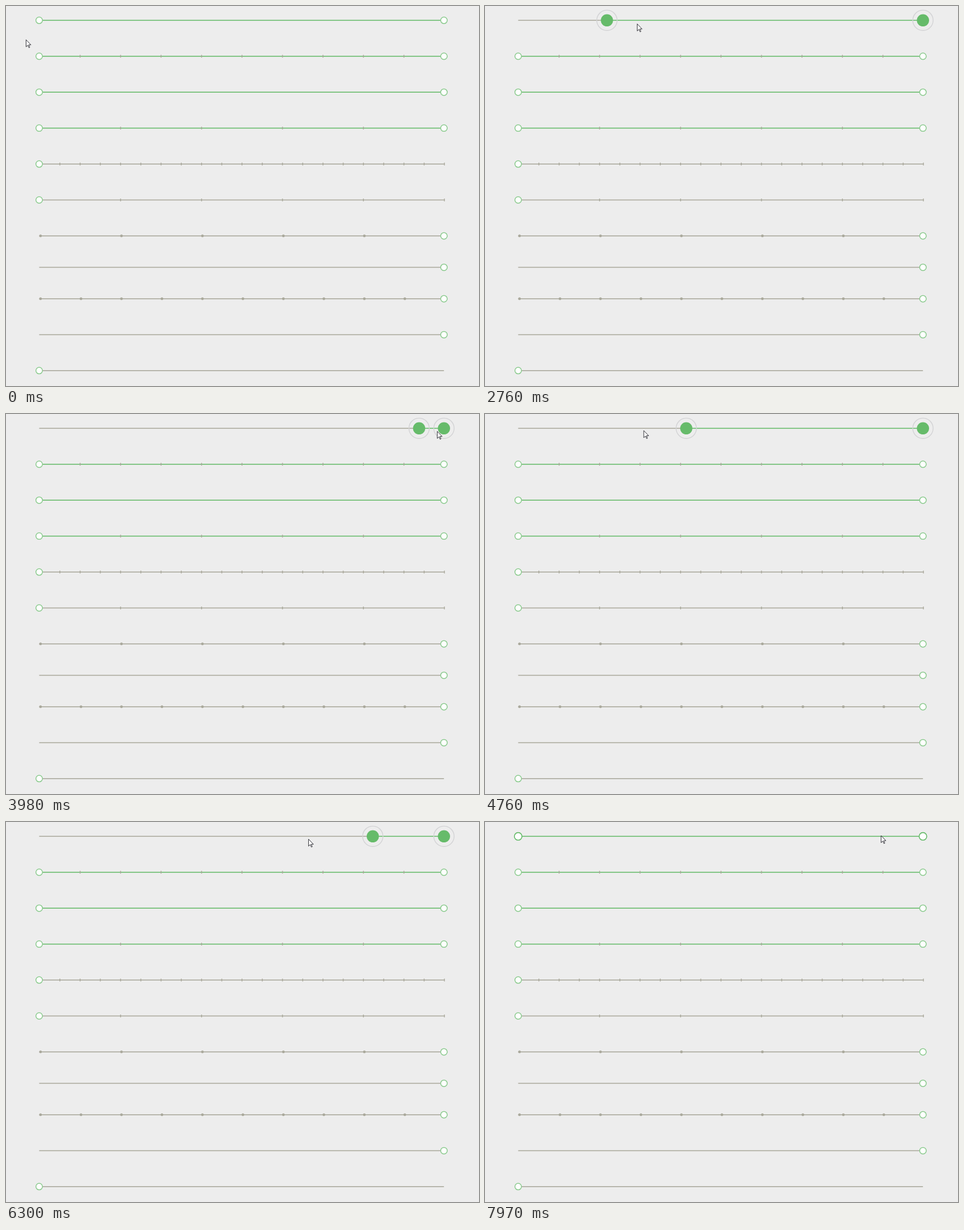
Recreate the animation shown at these times as an HTML page with a canvas. Size 834 by 671 pixels, loop 8000 ms.

```html
<!DOCTYPE html>
<html lang="en">
<head>
<meta charset="utf-8">
<title>Range sliders</title>
<style>
  html, body { margin: 0; height: 100%; overflow: hidden; background: #ededed; }
  canvas { display: block; }
</style>
</head>
<body>
<canvas id="stage" width="834" height="671"></canvas>
<script>
const ctx = document.getElementById('stage').getContext('2d');
const LOOP = 8000, STEP = 122, LAG = 100;
// The sliders are laid out in units of 0.793 pixels; a track is 900 units long
const SCALE = 0.793, LEFT = 58.5, TOP = 25.3, TRACK = 900;
const GREEN = '#66bb6a', PALE = '#8aca8d', GRAY = '#aaa99c', RING = '#d3d3d5';

const divisions = [0, 10, 0, 5, 20, 5, 5, 0, 10, 0, 0];
// Start and end of each pointer gesture
const gestures = [
  [0, 0], [400, 950], [1270, 1720], [2150, 3150], [3270, 3980],
  [4250, 5160], [5300, 6300], [6420, 6880], [7280, 7970],
];
// Time, x, y of the pointer's turning points
const path = [
  [270, 35, 59], [950, 57, 29], [2100, 57, 29], [2660, 215, 31], [2760, 268, 31],
  [3850, 760, 30], [4100, 760, 30], [5100, 7, 28], [5200, 7, 28], [5444, 372, 30],
  [5544, 443, 30], [5900, 801, 32], [6050, 790, 31], [6700, 51, 27],
  [7140, 51, 27], [7970, 767, 23],
];

const clamp = (v, lo, hi) => Math.min(hi, Math.max(lo, v));
const ramp = (t, start, end) => clamp((t - start) / (end - start), 0, 1);

function pointerAt(t) {
  const i = clamp(path.findIndex(key => key[0] >= t), 1, path.length - 1);
  const [t0, x0, y0] = path[i - 1], [t1, x1, y1] = path[i];
  const f = ramp(t, t0, t1);
  return [x0 + (x1 - x0) * f, y0 + (y1 - y0) * f];
}

// The picture moves in coarse steps and rests between gestures
function heldTime(t) {
  const [start, end] = gestures.filter(gesture => gesture[0] <= t).pop();
  return Math.min(end, start + Math.floor((t - start + 1) / STEP) * STEP);
}

function rect(x, y, w, h, color) {
  ctx.fillStyle = color;
  ctx.fillRect(x, y, w, h);
}

function circle(x, r, fill, stroke, width) {
  ctx.beginPath();
  ctx.arc(x, 0, r, 0, Math.PI * 2);
  ctx.fillStyle = fill;
  ctx.fill();
  if (!stroke) return;
  ctx.strokeStyle = stroke;
  ctx.lineWidth = width;
  ctx.stroke();
}

function thumb(x, r = 8.2, filled = false) {
  if (filled) return circle(x, r + 0.4, GREEN);
  const width = 1.9 + (r - 8.2) * 0.14;
  circle(x, r - width / 2, '#fff', r > 9 ? GREEN : PALE, width);
}

function drawRow(i) {
  rect(0, -1, TRACK, 2, i < 4 ? GREEN : GRAY);
  const count = divisions[i];
  for (let k = 0; count && k <= count; k++) {
    const x = TRACK * k / count;
    if (i < 6) rect(x, -3, 2, 6, GRAY);
    else circle(x + 3, 3, GRAY);
  }
  if (i < 6 || i === 10) thumb(0);
  if (i < 4 || (i > 5 && i < 10)) thumb(TRACK);
}

function drawActiveRow(t) {
  const dragging = t > 2150 && t < 7280;
  const x = dragging ? clamp((pointerAt(t - LAG)[0] - LEFT) / SCALE, 0, TRACK) : 0;
  const r = 8.2 + 1.3 * ramp(t, 670, 950)
    + 3.7 * (ramp(t, 1270, 1720) - ramp(t, 7140, 7556));
  rect(0, -1, x, 2, GRAY);
  rect(x, -1, TRACK - x, 2, GREEN);
  for (const cx of [TRACK, x]) {
    thumb(cx, r, x > 0);
    if (dragging) circle(cx, 22.6, 'transparent', RING, 1.8);
  }
}

function drawPointer([x, y]) {
  ctx.setTransform(SCALE, 0, 0, SCALE, x, y);
  const arrow = new Path2D('M.5 .8V16.5L4.2 13L6.8 18.5L8.8 17.6L6.3 12.2H11.3Z');
  ctx.fillStyle = '#fff';
  ctx.fill(arrow);
  ctx.strokeStyle = '#14141c';
  ctx.lineWidth = 1.1;
  ctx.stroke(arrow);
}

function draw() {
  const t = heldTime(performance.now() % LOOP);
  ctx.setTransform(1, 0, 0, 1, 0, 0);
  rect(0, 0, 834, 671, '#ededed');
  ctx.setTransform(SCALE, 0, 0, SCALE, LEFT, TOP);
  divisions.forEach((_, i) => {
    if (i) drawRow(i);
    else drawActiveRow(t);
    ctx.translate(0, i === 6 || i === 7 ? 70 : 80);
  });
  drawPointer(pointerAt(t));
  requestAnimationFrame(draw);
}
draw();
</script>
</body>
</html>
```
